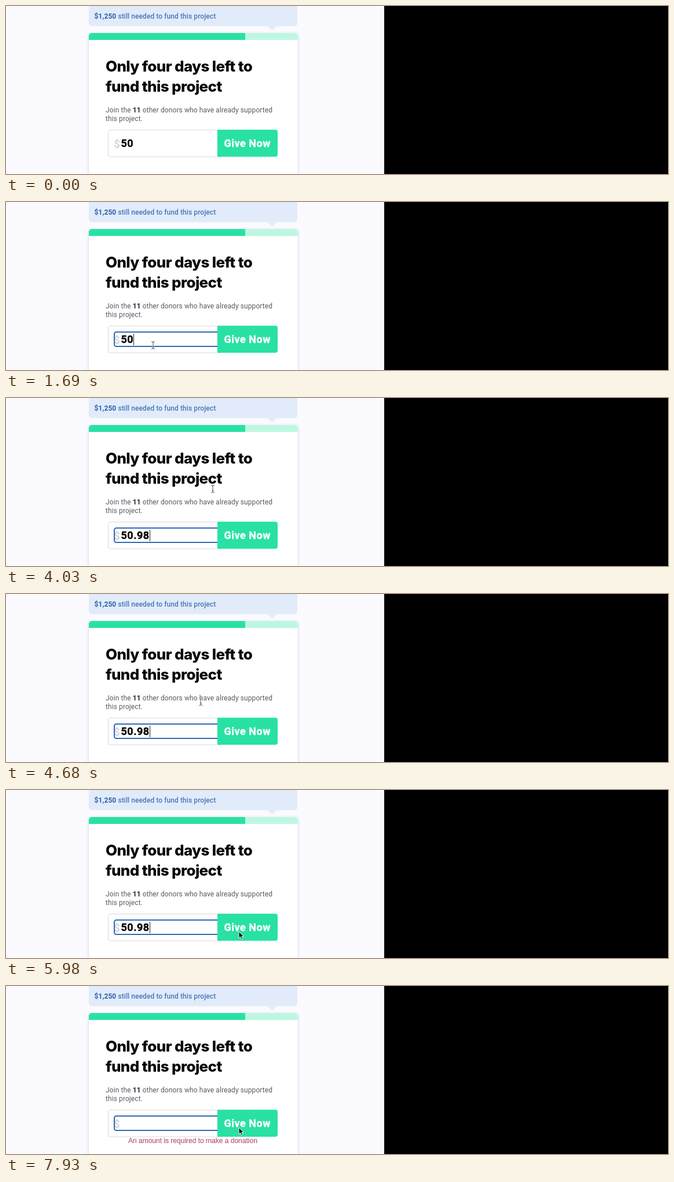
These frames come from a looping animation (1143 by 292 pixels, 8 s). An HTML page:

```html
<!DOCTYPE html>
<html lang="en">
<head>
<meta charset="utf-8">
<title>Donation card</title>
<style>
  html, body { margin: 0; width: 100%; height: 100%; overflow: hidden; background: #fafaff; }
  svg { display: block; }
  text { font-family: Roboto, sans-serif; white-space: pre; }
  .bold { font-weight: 700; }
  .note { font-size: 12px; font-weight: 500; letter-spacing: .08px; fill: #4577b8; }
  .note .bold { fill: #2b63ae; }
  .head { font: 800 26px Inter, sans-serif; letter-spacing: -.65px; fill: #050507; }
  .body { font-size: 12px; letter-spacing: .09px; fill: #5b5964; }
  .body .bold { fill: #24222b; }
  .big { font-size: 18px; font-weight: 700; letter-spacing: .5px; stroke-width: .4; }
  .dark { fill: #050507; stroke: #050507; }
  .light { fill: #fff; stroke: #fff; }
  .error { font: 12px "Liberation Sans", Arial, sans-serif; fill: #b9557d; stroke: #b9557d; stroke-width: .2; }
</style>
</head>
<body>
<svg width="1143" height="292" viewBox="0 0 1143 292">
  <defs>
    <filter id="shadow" x="-10%" y="-10%" width="120%" height="120%">
      <feDropShadow dx="0" dy="1" stdDeviation="2" flood-color="#5a6480" flood-opacity=".3"/>
    </filter>
    <clipPath id="card"><rect x="143" y="47" width="361" height="260" rx="5"/></clipPath>
    <path id="bar" d="M-3-6.500Q0-6.500 0-4.500Q0-6.500 3-6.500M0-5V5M-3 6.500Q0 6.500 0 4.500Q0 6.500 3 6.500M-1.500 2.500H1.500"/>
  </defs>
  <rect width="1143" height="292" fill="#fafaff"/>

  <path d="M143-10H503V30a5 5 0 0 1-5 5H467.500L459.500 42.500 451.500 35H148a5 5 0 0 1-5-5Z" fill="#e2ebf9"/>
  <text class="note" x="152.500" y="22"><tspan class="bold">$1,250</tspan> still needed to fund this project</text>

  <rect x="143" y="47" width="361" height="260" rx="5" fill="#fff" filter="url(#shadow)"/>
  <g clip-path="url(#card)">
    <rect x="143" y="47" width="361" height="12" fill="#bdf7e2"/>
    <rect x="143" y="47" width="270" height="12" fill="#29e1a4"/>
  </g>
  <text class="head" x="172" y="114">Only four days left to</text>
  <text class="head" x="172" y="149">fund this project</text>
  <text class="body" x="172" y="185">Join the <tspan class="bold">11</tspan> other donors who have already supported</text>
  <text class="body" x="172" y="200">this project.</text>

  <rect x="176.500" y="215.500" width="200" height="46.500" rx="4" fill="#fff" stroke="#d9d9dd"/>
  <text x="186.500" y="245.500" font-size="18" font-weight="500" fill="#cfcfd4">$</text>
  <rect id="ring" x="187" y="226" width="190" height="25" rx="3.500" fill="none" stroke="#2f69b8" stroke-width="2"/>
  <text id="amount" class="big dark" x="198.500" y="245"></text>
  <rect id="caret" y="229" width="1" height="20" fill="#222"/>
  <path d="M365 215H465a4 4 0 0 1 4 4V258a4 4 0 0 1-4 4H365Z" fill="#29e1a4"/>
  <text class="big light" x="376.500" y="245">Give Now</text>
  <text id="error" class="error" x="211" y="273">An amount is required to make a donation</text>

  <g id="beam" fill="none">
    <use href="#bar" stroke="#fff" stroke-width="2.500" opacity=".7"/>
    <use href="#bar" stroke="#55555a"/>
  </g>
  <path id="arrow" d="M0 0V11.500L2.600 9.100 4.500 13.300 6.500 12.400 4.700 8.300H8.200Z" fill="#111" stroke="#fff" stroke-width=".9"/>

  <rect x="653" width="490" height="292" fill="#000"/>
</svg>
<script>
const LOOP = 8000, STEP = 130;
const BLINK = 500, KEY = 130, ERASE = 345;
const ENTER = 130, FOCUS = 650, TYPE = 2470, RETURN = 3640, DELETE = 6500;
const FULL = "50.98", INITIAL = 2;

const [ring, amount, caret, error, beam, arrow] =
  ["ring", "amount", "caret", "error", "beam", "arrow"].map(id => document.getElementById(id));

// Pointer moves: into the field, up to the heading, back, then onto the button
const moves = [
  { from: ENTER, to: FOCUS, x: 254, y: 249 },
  { from: RETURN - STEP, to: 4030, x: 357, y: 158 },
  { from: 4420, to: 5070, x: 298, y: 241 },
  { from: 5460, to: 5980, x: 402, y: 246 }
];

const clamp = (v, lo, hi) => Math.min(hi, Math.max(lo, v));
const ease = p => p * p * (3 - 2 * p);
const show = (node, on) => node.setAttribute("visibility", on ? "visible" : "hidden");
const keys = (t, start, gap) => Math.max(0, Math.floor((t - start) / gap) + 1);

function value(t) {
  const typed = Math.min(FULL.length, INITIAL + keys(t, TYPE, KEY));
  return FULL.slice(0, Math.max(0, typed - keys(t, DELETE, ERASE)));
}

function caretOn(t, text) {
  if (t < FOCUS || !text) return false;
  if (t >= DELETE) return true;
  const since = t < TYPE ? t - FOCUS : Math.max(0, t - TYPE - KEY);
  return Math.floor(since / BLINK) % 2 === 0;
}

function pointerAt(t) {
  let x = 345, y = 206;
  for (const m of moves) {
    const p = ease(clamp((t - m.from) / (m.to - m.from), 0, 1));
    x += (m.x - x) * p;
    y += (m.y - y) * p;
  }
  return [x, y];
}

// The button and the card's blank gaps take the arrow
function overText(x, y) {
  const field = x < 365 && y > 225 && y < 252;
  return field || (y > 88 && y < 160) || (y > 173 && y < 205);
}

function draw(time) {
  const t = Math.floor((time % LOOP) / STEP) * STEP;
  const text = value(t);
  if (amount.textContent !== text) amount.textContent = text;
  const width = text ? amount.getComputedTextLength() : 0;
  caret.setAttribute("x", Math.round(198.5 + width));
  show(caret, caretOn(t, text));
  show(ring, t >= FOCUS);
  show(error, !text);

  const [x, y] = pointerAt(t);
  const visible = (t >= ENTER && t < TYPE) || t >= RETURN;
  const isBeam = overText(x, y);
  for (const node of [beam, arrow]) node.setAttribute("transform", `translate(${x} ${y})`);
  show(beam, visible && isBeam);
  show(arrow, visible && !isBeam);
}

const start = performance.now();
function tick() {
  draw(performance.now() - start);
  requestAnimationFrame(tick);
}
tick();
</script>
</body>
</html>
```
